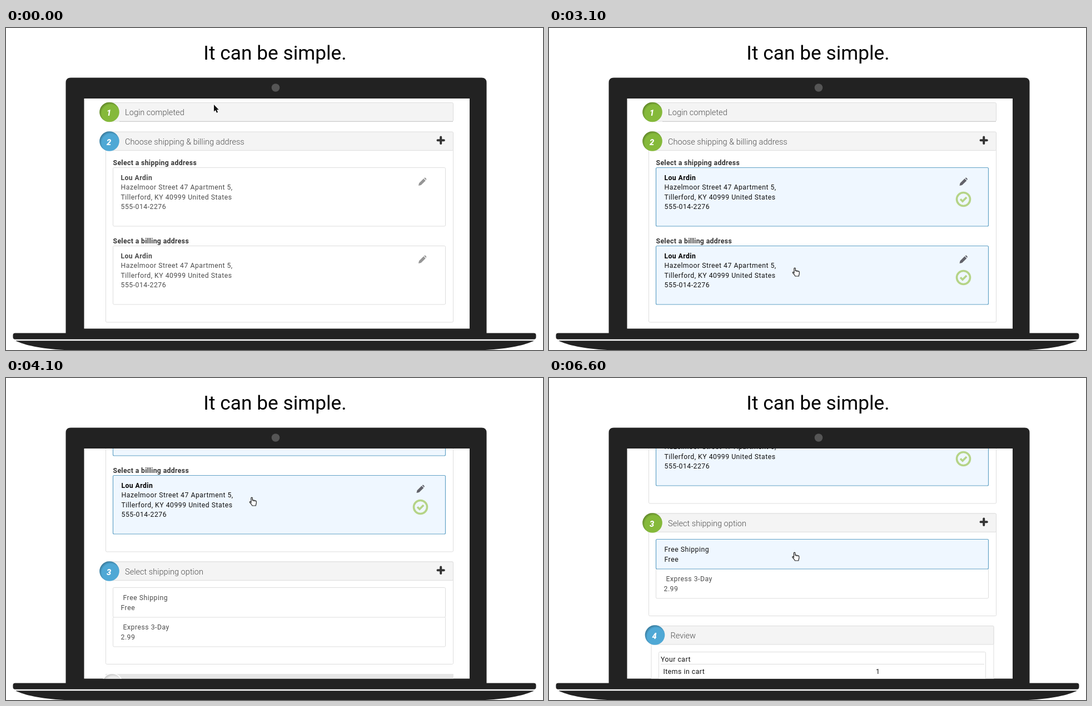
Recreate the animation shown at these times as an HTML page. Size 966 by 580 pixels, loop 8.6 s.

```html
<!DOCTYPE html>
<html lang="en">
<head>
<meta charset="utf-8">
<title>It can be simple.</title>
<style>
html, body { margin: 0; width: 100%; height: 100%; overflow: hidden; background: #fff; }
svg { display: block; width: 966px; height: 580px; font-family: Roboto, sans-serif; }
.title { font-size: 35.3px; text-anchor: middle; }
.head { font-size: 14.6px; font-weight: 300; fill: #505050; }
.label, .text { font-size: 12.25px; }
.label { font-weight: 700; letter-spacing: .36px; fill: #333; }
.text { font-weight: 400; letter-spacing: .5px; fill: #4c4c4c; }
.name { font-weight: 700; letter-spacing: .4px; fill: #4a4a4a; }
.num { font-size: 14.5px; font-weight: 900; font-style: italic; fill: #fff; text-anchor: middle; }
.panel { fill: #fff; stroke: #ddd; }
.bar { fill: #f4f4f4; stroke: #ddd; }
.box { fill: #fff; stroke: #ddd; }
.hover .box { fill: #f4f4f4; }
.on .box { fill: #eff7ff; stroke: #62a2c6; stroke-width: 1.2; }
.on .text { fill: #111; }
.on .name { fill: #000; }
.pencil { fill: #969696; }
.on .pencil { fill: #62626a; }
.check { display: none; fill: none; stroke: #b5d487; stroke-width: 3.6; }
.on .check { display: inline; }
.badge { fill: #4fa8d5; }
.done .badge { fill: #85b93a; }
</style>
</head>
<body>
<svg viewBox="0 0 966 580">
  <defs>
    <clipPath id="screen"><rect x="140.500" y="127" width="693.500" height="414.500"/></clipPath>
    <radialGradient id="shade" cx=".56" cy=".57" r=".56">
      <stop offset=".78" stop-color="#000" stop-opacity="0"/>
      <stop offset="1" stop-color="#000" stop-opacity=".24"/>
    </radialGradient>
  </defs>
  <rect width="966" height="580" fill="#fff"/>
  <text class="title" x="484" y="56.500">It can be simple.</text>
  <g fill="#222">
    <path d="M107.500 552V98.500q0-9 9-9H855.500q9 0 9 9V552Z"/>
    <rect x="12.500" y="549.500" width="941" height="11.300" rx="4"/>
    <path d="M17 563.300H950C934 571 905 578 862 580H105C62 578 33 571 17 563.300Z"/>
  </g>
  <circle cx="485" cy="107.500" r="7.300" fill="#555"/>
  <rect x="140.500" y="127" width="693.500" height="414.500" fill="#fff"/>
  <g clip-path="url(#screen)"><g id="page"></g></g>
</svg>
<script>
const LOOP = 8600, TICK = 100;
const page = document.getElementById('page');

const rect = (cls, x, y, w, h, r = 2) =>
  `<rect class="${cls}" x="${x}" y="${y}" width="${w}" height="${h}" rx="${r}"/>`;
const text = (cls, x, y, s) => `<text class="${cls}" x="${x}" y="${y}">${s}</text>`;
const at = (x, y, body, cls = '') => `<g class="${cls}" transform="translate(${x} ${y})">${body}</g>`;

const badge = (x, y, n) => at(x, y,
  `<circle class="badge" r="17.8"/><circle r="17.8" fill="url(#shade)"/>` + text('num', -1, 6.5, n));
const plus = y => `<path d="M776.500 ${y}H787.800M782.200 ${y - 5.7}v11.400" stroke="#333" stroke-width="4" stroke-linecap="round"/>`;
const pencil = '<path class="pencil" d="M-7 7l1-4.600L2.200-5.700 5.800-2.100-2.400 6ZM3.100-6.500L4-7.200Q4.800-7.800 5.600-7L7-5.600Q7.700-4.800 7-4L6.600-2.900Z"/>';
const check = '<g class="check"><circle r="12"/><path d="M-5.500-.3L-1.500 3.700 5.700-3.500"/></g>';

function header(y, n, title, open = true) {
  return rect('bar', 179.5, y, 625, 33.5) + badge(186, y + 17, n) +
    text('head', 214, y + 22.5, title) + (open ? plus(y + 15.3) : '');
}

const ADDRESS = ['Lou Ardin', 'Hazelmoor Street 47 Apartment 5,', 'Tillerford, KY 40999 United States', '555-014-2276'];
function addressCard(id, y) {
  const lines = ADDRESS.map((s, i) =>
    text(i ? 'text' : 'text name', 206.5, y + 22 + i * 17.5, s)).join('');
  return `<g id="${id}">` + rect('box', 192.5, y, 598, 105.5) +
    `<g class="lines">${lines}</g>` +
    at(749, y + 25, pencil, 'edit') + at(745.5, y + 57, check) + '</g>';
}

function option(id, y, name, price) {
  return `<g id="${id}">` + rect('box', 192.5, y, 598, 53.5) +
    text('text first', 210.5, y + 22.5, name) +
    text('text lines', 206.5, y + 40, price) + '</g>';
}

const review =
  rect('panel', 184, 750.5, 616, 200) + rect('bar', 184, 750.5, 616, 33.5) +
  badge(190.5, 767, 4) + text('head', 218.5, 773, 'Review') +
  rect('box', 197.5, 797.5, 588, 120) +
  '<path d="M201 819.500H783" stroke="#ddd"/>' +
  '<g class="on">' + text('text', 201, 814.5, 'Your cart') +
  text('text', 205.5, 837, 'Items in cart') + text('text', 588, 837, '1') + '</g>';

const waiting = '<rect x="179" y="750" width="626" height="200" fill="#e6e6e6"/>' +
  at(191, 767.5, '<circle r="18" fill="#ebebeb" stroke="#fff" stroke-width="2"/><circle r="17.500" fill="url(#shade)" opacity=".55"/>' +
    text('num', -1, 6.5, 4));

const ARROW = 'M0 0V12.500L2.900 9.900 5 14.700 7.100 13.800 5.100 9.200H8.800Z';
const HAND = 'M3.400 9.600V1.800C3.400.3 5.800.3 5.800 1.800V6.200C6.200 5 8 5.200 8.100 6.500 8.600 5.600 10.200 5.800 10.400 7 11 6.300 12.800 6.500 12.800 8V10.600C12.800 12 12 13 11.800 15.500H5.400C5 13.800 3 12 1 9.600 .2 8.400 1.600 7.600 2.400 8.400Z';

page.innerHTML =
  '<g class="done">' + header(134.5, 1, 'Login completed', false) +
  '<path d="M204 168.500H804" stroke="#ccc"/></g>' +
  rect('panel', 179.5, 187.5, 625, 342.5) +
  '<g id="step2">' + header(187, 2, 'Choose shipping &amp; billing address') + '</g>' +
  text('label', 192.5, 246.5, 'Select a shipping address') + addressCard('ship', 251.5) +
  text('label', 192.5, 387.5, 'Select a billing address') + addressCard('bill', 392.5) +
  rect('panel', 179.5, 548, 625, 184.5) +
  '<g id="step3">' + header(548, 3, 'Select shipping option') + '</g>' +
  option('express', 647.5, 'Express 3-Day', '2.99') + option('free', 594.5, 'Free Shipping', 'Free') +
  `<g id="waiting">${waiting}</g><g id="review">${review}</g>` +
  `<g id="cursor"><path id="arrow" d="${ARROW}" fill="#111" stroke="#fff" stroke-width="1" paint-order="stroke"/>` +
  `<path id="hand" d="${HAND}" transform="translate(-4.500 -.5)" fill="#fff" stroke="#222" stroke-width="1.200"/></g>`;

const el = id => document.getElementById(id);
const show = (id, yes) => { el(id).style.display = yes ? '' : 'none'; };

// Pointer path in page space: time, x, y
const PATH = [
  [0, 374, 138], [900, 427, 240], [1200, 427, 298], [2200, 427, 298], [2700, 438, 380],
  [2900, 442, 432], [4100, 442, 432], [4700, 446, 554], [5400, 445, 588], [5700, 441.5, 618]
];
function pointer(t) {
  const i = PATH.findIndex(k => k[0] > t);
  if (i < 0) return PATH[PATH.length - 1].slice(1);
  const [a, b] = [PATH[i - 1], PATH[i]];
  const u = (t - a[0]) / (b[0] - a[0]);
  return [a[1] + (b[1] - a[1]) * u, a[2] + (b[2] - a[2]) * u];
}

function scroll(t) {
  const u = Math.min(1, Math.max(0, (t - 3325) / 1200));
  return Math.round(304 * u * u * (3 - 2 * u));
}

// Clickable areas: id, top, bottom, time of the click
const TARGETS = [['ship', 252, 357, 1500], ['bill', 392, 498, 3000], ['free', 594, 648, 5800]];

function draw(t) {
  const [x, y] = pointer(t);
  let over = false;
  for (const [id, top, bottom, click] of TARGETS) {
    const inside = y >= top && y <= bottom, on = t >= click, g = el(id);
    over = over || inside;
    g.setAttribute('class', on ? 'on' : inside ? 'hover' : '');
    g.querySelector('.lines').setAttribute('transform', `translate(${on ? 1 : 0} 0)`);
    const edit = g.querySelector('.edit'), first = g.querySelector('.first');
    if (edit) edit.setAttribute('transform', `translate(${on ? 745.5 : 749} ${top + 25})`);
    if (first) first.setAttribute('x', on ? 207.5 : 210.5);
  }
  el('step2').setAttribute('class', t >= 3000 ? 'done' : '');
  el('step3').setAttribute('class', t >= 6000 ? 'done' : '');
  show('waiting', t < 6000);
  show('review', t >= 6000);
  show('hand', over);
  show('arrow', !over);
  el('cursor').setAttribute('transform', `translate(${x} ${y})`);
  page.setAttribute('transform', `translate(0 ${-scroll(t)})`);
}

const start = performance.now();
function frame(now) {
  const t = Math.max(0, now - start) % LOOP;
  draw(Math.floor(t / TICK) * TICK);
  requestAnimationFrame(frame);
}
draw(0);
requestAnimationFrame(frame);
</script>
</body>
</html>
```
